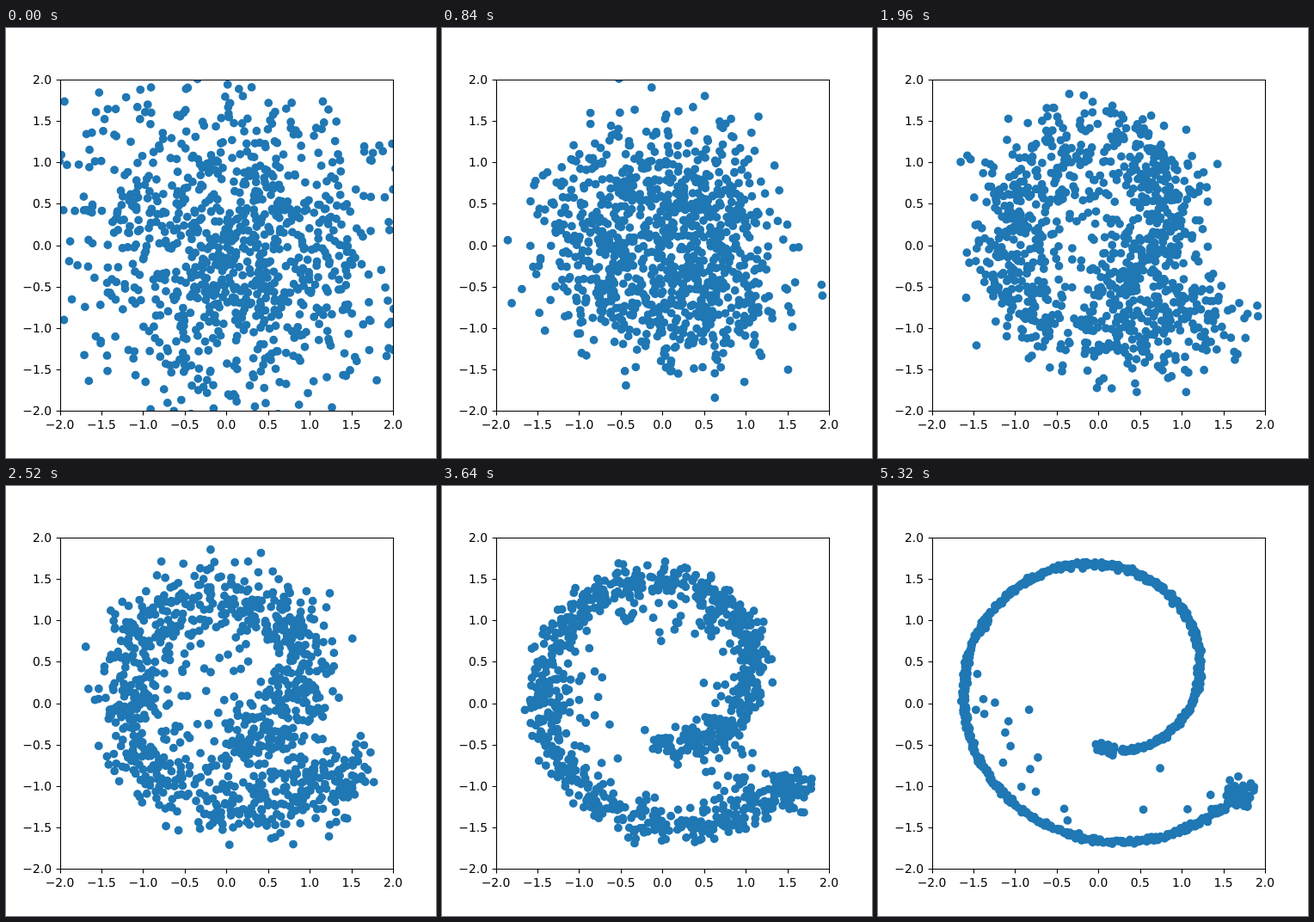
An HTML page with a canvas that plays this animation: 500 px wide and 500 px high, repeating every 5.46 s.

```html
<!DOCTYPE html>
<html lang="en">
<head>
<meta charset="utf-8">
<title>Scatter</title>
<style>
html, body { margin: 0; width: 100%; height: 100%; overflow: hidden; background: #fff; }
canvas, svg { position: absolute; left: 0; top: 0; }
text { font: 13.889px "DejaVu Sans", sans-serif; text-rendering: geometricPrecision; }
</style>
</head>
<body>
<canvas id="plot" width="500" height="500"></canvas>
<svg id="axes" width="500" height="500"></svg>
<script>
const STEP = 140, STEPS = 39, COUNT = 1000, LAGGARDS = 20;
const T_START = 4.6, T_SPAN = 7.75, T_END = 11.85;
const RADIUS = 4.9;

const toX = x => 256.25 + x * 96.875;
const toY = y => 252.5 - y * 96.25;

let seed = 7;
function random() {
  seed = (seed + 0x6D2B79F5) | 0;
  let t = Math.imul(seed ^ (seed >>> 15), seed | 1);
  t ^= t + Math.imul(t ^ (t >>> 7), t | 61);
  return ((t ^ (t >>> 14)) >>> 0) / 4294967296;
}
const gauss = () =>
  Math.sqrt(-2 * Math.log(1 - random())) * Math.cos(2 * Math.PI * random());

// Archimedean spiral, in axis units
const spiral = t => ({
  x: .081 + .18 * t * Math.cos(t),
  y: .28 + .178 * t * Math.sin(t)
});

// p runs from 0 to 1 over the loop: the spiral grows while its noise fades.
const scaleAt = p => 1 - .55 * (1 - p) ** 1.5;
const spreadAt = p => .012 + .5 * (1 - p) ** 1.5 + .36 * (1 - p) ** 30;

// Each dot drifts from noise to its place; a few lag behind inside.
function makePath(i) {
  const lags = i < LAGGARDS;
  const t = lags ? 9.3 + 2.5 * random() : T_START + T_SPAN * random() ** .85;
  const pull = lags ? .1 + .45 * random() ** 2 : random() ** 10;
  const loose = t > T_END ? .08 : t < T_START + .3 ? .04 : 0;
  const goal = spiral(Math.min(t, T_END));
  goal.x += loose * gauss();
  goal.y += loose * gauss();

  let noiseX = gauss(), noiseY = gauss();
  return Array.from({ length: STEPS }, (_, k) => {
    const p = k / (STEPS - 1);
    const lag = lags ? pull : pull * (1 - .97 * p ** 1.5);
    const scale = scaleAt(p), spread = spreadAt(p);
    const x = (goal.x + (-.2 - goal.x) * lag) * scale + noiseX * spread;
    const y = (goal.y + (-.3 - goal.y) * lag) * scale + noiseY * spread;
    noiseX = .85 * noiseX + .527 * gauss();
    noiseY = .85 * noiseY + .527 * gauss();
    return [toX(x), toY(y)];
  });
}
const paths = Array.from({ length: COUNT }, (_, i) => makePath(i));

function drawAxes() {
  const snap = v => Math.floor(v + .5) + .5;
  let marks = "M63.5 60.5H450.5V445.5H63.5Z", labels = "";
  for (let value = -2; value <= 2; value += .5) {
    const label = (value < 0 ? "\u2212" : "") + Math.abs(value).toFixed(1);
    const x = toX(value), y = toY(value);
    marks += `M${snap(x)} 445.5v4.9M63.5 ${snap(y)}h-4.9`;
    labels += `<text x="${x}" y="466" text-anchor="middle">${label}</text>
      <text x="53" y="${Math.round(y + 5)}" text-anchor="end">${label}</text>`;
  }
  document.getElementById("axes").innerHTML =
    `<path d="${marks}" fill="none" stroke="#000" stroke-width="1.1"/>${labels}`;
}

const ctx = document.getElementById("plot").getContext("2d");
ctx.beginPath();
ctx.rect(63, 60, 387.5, 385.5);
ctx.clip();
ctx.fillStyle = "#1f77b4";

function draw(k) {
  ctx.clearRect(0, 0, 500, 500);
  ctx.beginPath();
  for (const path of paths) {
    const [x, y] = path[k];
    ctx.moveTo(x + RADIUS, y);
    ctx.arc(x, y, RADIUS, 0, 2 * Math.PI);
  }
  ctx.fill();
}

const start = performance.now();
let shown = -1;
function tick() {
  const k = Math.floor((performance.now() - start) / STEP) % STEPS;
  if (k !== shown) draw(shown = k);
  requestAnimationFrame(tick);
}
drawAxes();
tick();
</script>
</body>
</html>
```
